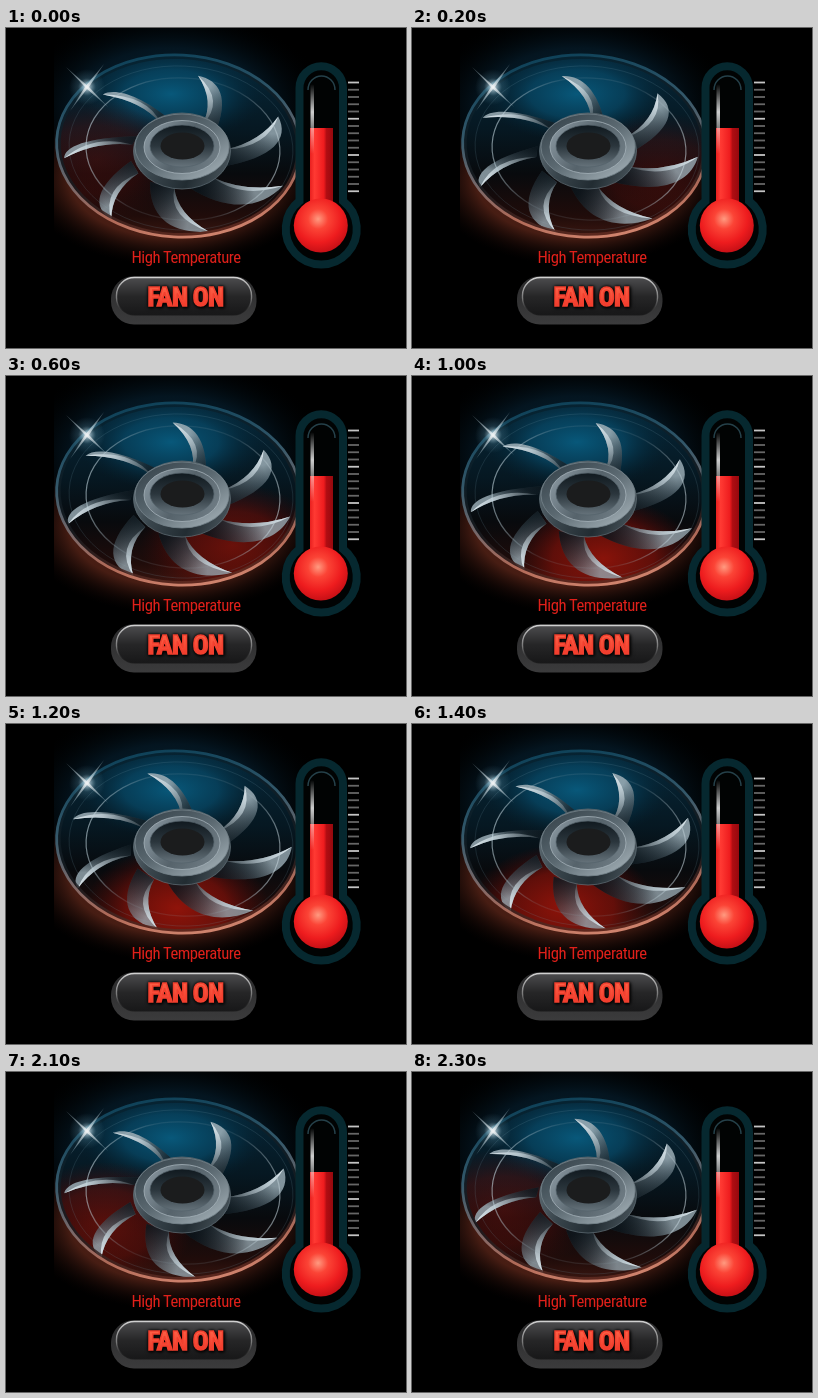
An HTML page with a canvas that plays this animation: 400x320 px, repeating every 2400 ms.

```html
<!DOCTYPE html>
<html lang="en">
<head>
<meta charset="utf-8">
<title>Fan and thermometer</title>
<style>
html, body { margin: 0; width: 100%; height: 100%; overflow: hidden; background: #000; }
canvas, svg { position: absolute; left: 0; top: 0; width: 400px; height: 320px; }
text { font-family: "Roboto Condensed", "Open Sans Condensed", "Open Sans", "Noto Sans", sans-serif; font-stretch: condensed; text-anchor: middle; }
#label { font-size: 19px; letter-spacing: -.5px; fill: #e0201a; }
#state { font-size: 34px; font-weight: 900; letter-spacing: -.6px; fill: url(#hot); stroke: #f2402f; stroke-width: 1.5; }
</style>
</head>
<body>
<canvas id="fan" width="400" height="320"></canvas>
<svg viewBox="0 0 400 320">
  <defs>
    <radialGradient id="spark">
      <stop offset="0" stop-color="#fff"/>
      <stop offset=".2" stop-color="#cfeaf5" stop-opacity=".7"/>
      <stop offset=".5" stop-color="#6ba0b5" stop-opacity=".25"/>
      <stop offset="1" stop-color="#6ba0b5" stop-opacity="0"/>
    </radialGradient>
    <radialGradient id="ray">
      <stop offset="0" stop-color="#fff"/>
      <stop offset="1" stop-color="#bcd5df" stop-opacity=".45"/>
    </radialGradient>
    <radialGradient id="bulb" cx=".45" cy=".38" r=".62">
      <stop offset="0" stop-color="#ff9a80"/>
      <stop offset=".3" stop-color="#fb4436"/>
      <stop offset=".7" stop-color="#ee1c1e"/>
      <stop offset="1" stop-color="#c81016"/>
    </radialGradient>
    <linearGradient id="column">
      <stop offset="0" stop-color="#e8201f"/>
      <stop offset=".2" stop-color="#ff3a33"/>
      <stop offset=".6" stop-color="#ee1c1e"/>
      <stop offset=".72" stop-color="#b00d12"/>
      <stop offset="1" stop-color="#96090e"/>
    </linearGradient>
    <linearGradient id="shine" x2="0" y2="1">
      <stop offset="0" stop-color="#fff" stop-opacity="0"/>
      <stop offset=".4" stop-color="#fff" stop-opacity=".8"/>
      <stop offset="1" stop-color="#fff" stop-opacity="0"/>
    </linearGradient>
    <linearGradient id="rim" x2="0" y2="1">
      <stop offset="0" stop-color="#2a2a2b"/>
      <stop offset="1" stop-color="#3b3b3c"/>
    </linearGradient>
    <linearGradient id="face" x2="0" y2="1">
      <stop offset="0" stop-color="#4c4c4e"/>
      <stop offset=".5" stop-color="#262627"/>
      <stop offset="1" stop-color="#171718"/>
    </linearGradient>
    <linearGradient id="edge" x2="0" y2="1">
      <stop offset="0" stop-color="#d0d0d0"/>
      <stop offset=".55" stop-color="#9a9a9a" stop-opacity=".7"/>
      <stop offset=".9" stop-color="#333" stop-opacity=".2"/>
    </linearGradient>
    <linearGradient id="hot" x2="0" y2="1">
      <stop offset="0" stop-color="#ff6a4c"/>
      <stop offset="1" stop-color="#ee2f24"/>
    </linearGradient>
  </defs>

  <circle cx="81" cy="59" r="18" fill="url(#spark)" opacity=".85"/>
  <path d="M60 39L80.5 57L98 36L83 59L102 79L81 61L64 83L79 59Z" fill="url(#ray)" opacity=".75"/>

  <path d="M293.5 60a21.75 21.75 0 0 1 43.5 0V173a35.5 35.5 0 1 1-43.5 0Z" fill="#010303" stroke="#06282f" stroke-width="8"/>
  <path d="M302 62a13.5 14 0 0 1 27 0" fill="none" stroke="#25414a" stroke-width="1.5"/>
  <rect x="304" y="100" width="23" height="82" fill="url(#column)"/>
  <circle cx="314.8" cy="197.5" r="27" fill="url(#bulb)"/>
  <rect x="304.5" y="56" width="3.5" height="70" rx="1.7" fill="url(#shine)"/>
  <g id="ticks" stroke-width="1.8"/>

  <text id="label" x="180" y="234.5">High Temperature</text>
  <rect x="105" y="248" width="145.5" height="48.5" rx="23" fill="url(#rim)"/>
  <rect x="110.5" y="249.5" width="135" height="38" rx="18" fill="url(#face)" stroke="url(#edge)" stroke-width="1.4"/>
  <g style="filter:drop-shadow(0 0 1.5px #000) drop-shadow(1px 1px 1.5px #000)">
    <text id="state" x="179.5" y="278">FAN ON</text>
  </g>
</svg>
<script>
const STEP = 100, STEPS = 24, BLADES = 7, PHASE = 23;
const ctx = document.getElementById("fan").getContext("2d");
const rad = deg => deg * Math.PI / 180;
const cos = deg => Math.cos(rad(deg));
const sin = deg => Math.sin(rad(deg));
const TILT = rad(3);

// Polar point in the plane swept by the blade tips.
const at = (r, deg) => [172 + 114 * r * cos(deg), 126.5 + 80 * r * sin(deg)];

function withStops(g, stops) {
  stops.forEach(([p, c]) => g.addColorStop(p, c));
  return g;
}
const linear = (a, b, ...stops) => withStops(ctx.createLinearGradient(...a, ...b), stops);
const radial = (r, ...stops) => withStops(ctx.createRadialGradient(0, 0, 0, 0, 0, r), stops);

function oval(x, y, rx, ry, fill, stroke, width = 1, tilt = 0) {
  ctx.beginPath();
  ctx.ellipse(x, y, rx, ry, tilt, 0, 7);
  if (fill) { ctx.fillStyle = fill; ctx.fill(); }
  if (stroke) { ctx.strokeStyle = stroke; ctx.lineWidth = width; ctx.stroke(); }
}

// Soft elliptical light, cut off at the panel edges.
function glow(x, y, rx, ry, ...stops) {
  ctx.save();
  ctx.beginPath();
  ctx.rect(48, 0, 304, 240);
  ctx.clip();
  ctx.translate(x, y);
  ctx.scale(1, ry / rx);
  ctx.fillStyle = radial(rx, ...stops);
  ctx.fillRect(-rx, -rx, 2 * rx, 2 * rx);
  ctx.restore();
}

function drawBlade(a) {
  const width = 21 + 10 * cos(a - 30);
  const low = (1 + sin(a + 15)) / 2;
  const root = at(.42, a + 20), tip = at(1, a), end = at(.42, a + 23 + width);

  ctx.beginPath();
  ctx.moveTo(...root);
  ctx.quadraticCurveTo(...at(.74, a + 16), ...tip);
  ctx.bezierCurveTo(...at(1, a + width * .65), ...at(.84, a + width + 5), ...end);
  ctx.closePath();
  ctx.fillStyle = linear(at(.75, a + 8), at(.72, a + 16 + width),
    [0, `rgba(150,168,177,${.92 - .15 * low})`],
    [.5, `rgba(98,116,126,${.8 - .25 * low})`],
    [1, `rgba(58,76,86,${.6 - .3 * low})`]);
  ctx.fill();
  ctx.fillStyle = linear(at(.38, a + 30), at(.85, a + 18),
    [0, "rgba(3,12,18,.7)"], [1, "rgba(3,12,18,0)"]);
  ctx.fill();

  // Bright sliver along the leading edge.
  ctx.beginPath();
  ctx.moveTo(...root);
  ctx.quadraticCurveTo(...at(.74, a + 16), ...tip);
  ctx.quadraticCurveTo(...at(.79, a + 22), ...root);
  ctx.fillStyle = linear(root, tip,
    [0, "rgba(200,214,221,.15)"], [.6, "rgba(200,214,221,.7)"], [1, "rgba(225,235,240,.95)"]);
  ctx.fill();
}

function drawHub() {
  oval(176, 123, 48.5, 38, linear([128, 105], [224, 145],
    [0, "#5d6b73"], [.3, "#39454c"], [.65, "#222c32"], [1, "#4a565d"]), "#5c6a72", .8);
  oval(176, 119, 47, 33, linear([150, 90], [190, 152],
    [0, "#3d4a52"], [.5, "#5b6971"], [1, "#93a0a7"]), "#76848c", .8);
  oval(176, 119, 38, 26.5, linear([145, 100], [208, 138],
    [0, "#83919a"], [.5, "#56636b"], [1, "#6f7c84"]), "#a5b2b9", .8);
  oval(176, 118, 32, 21, linear([176, 97], [176, 139],
    [0, "#10191f"], [.5, "#2b363d"], [1, "#66737b"]), "#54626a", .7);
  oval(176.5, 118, 22, 13.5, "#1b1c1d");
}

function drawFan(step) {
  ctx.fillStyle = "#000";
  ctx.fillRect(0, 0, 400, 320);
  glow(165, 80, 160, 100, [0, "#0a2b3b"], [.6, "#041520"], [1, "rgba(0,0,0,0)"]);
  glow(165, 150, 150, 88, [0, "#6a2a1c"], [.68, "rgba(88,36,24,.8)"], [1, "rgba(20,6,4,0)"]);

  ctx.save();
  ctx.beginPath();
  ctx.ellipse(172.5, 118, 121, 90, TILT, 0, 7);
  ctx.clip();
  ctx.fillStyle = linear([0, 28], [0, 210],
    [0, "#06283a"], [.4, "#061822"], [.65, "#080a0d"], [.88, "#200c0a"], [1, "#3c1711"]);
  ctx.fillRect(48, 20, 260, 200);
  glow(165, 66, 95, 48, [0, "#08587a"], [.5, "rgba(7,72,102,.75)"], [1, "rgba(4,34,50,0)"]);

  // The red light wanders along the lower half once per turn.
  const phase = ((step + STEPS - 2) % STEPS) / (STEPS - 2);
  const turn = Math.min(1, phase);
  const heat = .3 + .65 * Math.sin(Math.PI * turn);
  const [hx, hy] = at(.72, 20 + 155 * turn);
  glow(hx, hy, 92, 62,
    [0, `rgba(150,20,10,${heat})`], [.55, `rgba(122,16,9,${heat * .8})`], [1, "rgba(80,10,8,0)"]);

  oval(175, 120, 112, 82, null, "rgba(110,150,165,.18)", 1, TILT);
  for (let i = 0; i < BLADES; i++) drawBlade(PHASE + step * 360 / STEPS + i * 360 / BLADES);
  oval(177, 121, 97, 71, null, linear([80, 100], [275, 140],
    [0, "rgba(200,220,228,.6)"], [.3, "rgba(140,160,170,.15)"],
    [.7, "rgba(140,160,170,.15)"], [1, "rgba(200,215,222,.6)"]), 1.2, TILT);
  ctx.restore();

  drawHub();
  oval(172.5, 118, 120, 89, null, linear([150, 30], [185, 207],
    [0, "rgba(6,34,48,.9)"], [.6, "rgba(25,28,32,.8)"], [1, "rgba(95,42,32,.9)"]), 4, TILT);
  oval(172.5, 118, 122, 91, null, linear([150, 26], [185, 211],
    [0, "#0f4259"], [.35, "#34586a"], [.6, "#75686a"], [.82, "#b06a58"], [1, "#cf836d"]), 2.8, TILT);
}

function addTicks() {
  const box = document.getElementById("ticks");
  for (let i = 0; i < 16; i++) {
    const line = document.createElementNS(box.namespaceURI, "path");
    line.setAttribute("d", `M342 ${54.5 + i * 7.25}h11`);
    line.setAttribute("stroke", i % 5 ? "#666" : "#c4c4c4");
    box.append(line);
  }
}

// Lower the font size where the available face is too broad.
function limitSize(id, size, room) {
  const el = document.getElementById(id);
  const width = el.getComputedTextLength();
  el.style.fontSize = size * Math.min(1, room / width) + "px";
}

addTicks();
limitSize("label", 19, 110);
limitSize("state", 34, 77);

const start = performance.now();
let shown = -1;
function frame() {
  const step = Math.floor((performance.now() - start) / STEP) % STEPS;
  if (step !== shown) drawFan(shown = step);
  requestAnimationFrame(frame);
}
frame();
</script>
</body>
</html>
```
